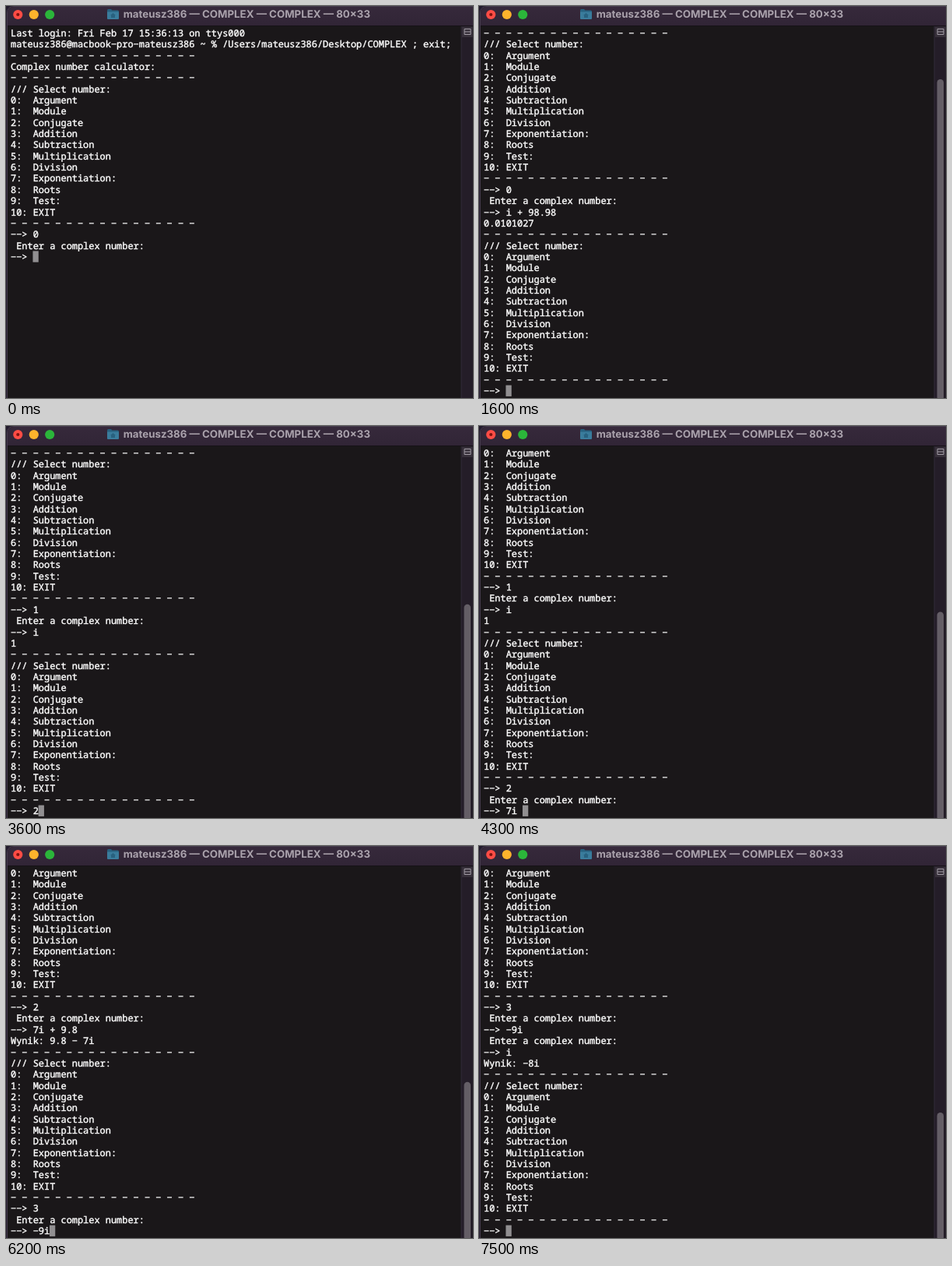
Recreate the animation shown at these times as an HTML page. Size 600 by 503 pixels, loop 8 s.

```html
<!DOCTYPE html>
<html lang="en">
<head>
<meta charset="utf-8">
<title>Complex number calculator</title>
<style>
  html, body { margin: 0; width: 100%; height: 100%; overflow: hidden; background: #1a1719; }
  svg { display: block; width: 600px; height: 503px; }
  text { white-space: pre; text-rendering: geometricPrecision; }
  #rows { font: 500 11.94px "Noto Sans Mono", monospace; fill: #fff; stroke: #fff; stroke-width: .4px; }
  #title { font: 700 13.3px Inter, sans-serif; fill: #aaa2ac; text-anchor: end; }
</style>
</head>
<body>
<svg viewBox="0 0 600 503">
  <defs>
    <linearGradient id="bar" x2="0" y2="1">
      <stop offset="0" stop-color="#36293b"/>
      <stop offset="1" stop-color="#312536"/>
    </linearGradient>
  </defs>
  <rect width="600" height="503" fill="#221a2c"/>
  <path d="M1.5 510V9Q1.5 .5 10 .5H610V510Z" fill="#1a1719" stroke="#51475a" stroke-width=".8"/>
  <path d="M2 25V9Q2 1 10 1H600V25Z" fill="url(#bar)"/>
  <path d="M2 25.5H600" stroke="#161117"/>

  <circle cx="15.3" cy="11" r="6.1" fill="#fe4c45"/>
  <circle cx="15.3" cy="11" r="2.1" fill="#7c130f"/>
  <circle cx="35.8" cy="11" r="6.1" fill="#fdb32c"/>
  <circle cx="56.2" cy="11" r="6.1" fill="#2bb53a"/>

  <g transform="translate(0 -.5)">
    <path d="M130 16V6Q130 4.5 131.5 4.5H135L136.5 6H143.5Q145 6 145 7.5V16Q145 17.5 143.5 17.5H131.5Q130 17.5 130 16Z" fill="#28617f"/>
    <path d="M130 8H145V16Q145 17.5 143.5 17.5H131.5Q130 17.5 130 16Z" fill="#3a7c9c"/>
    <path d="M137.5 9.5L141 12.5H140V15.5H135V12.5H134Z" fill="#28617f"/>
  </g>
  <text id="title" x="468" y="15.2"></text>

  <rect x="585" y="26" width="15" height="477" fill="#241d28"/>
  <path d="M585 26V503" stroke="#393040" stroke-width=".8"/>
  <rect x="586" y="26.5" width="13.5" height="13.5" fill="#37303a"/>
  <path d="M589 29.5H597V36.5H589ZM589 33H597" fill="none" stroke="#a39ca6"/>
  <rect id="knob" x="588.5" width="8.5" rx="4.25" fill="#645e66"/>

  <rect id="cursor" width="7.3" height="14.3" fill="#918f91"/>
  <g id="rows"></g>
</svg>
<script>
const LOOP = 8000, ROWS = 33, LEFT = 6, COL = 7.164, LINE = 14.35;
const USER = "mateusz386";
const $ = id => document.getElementById(id);

const rule = Array(17).fill("-").join(" ") + "\n";
const items = ["Argument", "Module", "Conjugate", "Addition", "Subtraction", "Multiplication",
  "Division", "Exponentiation:", "Roots", "Test:", "EXIT"];
const menu = rule + "/// Select number:\n" +
  items.map((name, i) => (i + ":").padEnd(4) + name + "\n").join("") + rule + "--> ";
const ask = "\n Enter a complex number:\n--> ";
const result = value => "\n" + value + "\n" + menu;

const intro = "Last login: Fri Feb 17 15:36:13 on ttys000\n" +
  `${USER}@macbook-pro-${USER} ~ % /Users/${USER}/Desktop/COMPLEX ; exit;\n` +
  rule + "Complex number calculator:\n" + menu + "0" + ask;

// Each entry appends its text to the session at the given time.
const session = [
  [0, intro],
  [200, "i"], [300, " "], [400, "+"], [500, " 9"], [600, "8."], [700, "98"],
  [1200, result("0.0101027")],
  [2200, "1" + ask], [2500, "i"], [3000, result("1")],
  [3400, "2"], [3800, ask],
  [4000, "7"], [4200, "i"], [4300, " "], [4400, "+"], [4500, " "], [4600, "9"], [4700, "."], [4800, "8"],
  [5000, result("Wynik: 9.8 - 7i")],
  [5400, "3"], [5500, ask],
  [6000, "-"], [6100, "9"], [6200, "i"],
  [7000, ask], [7200, "i"], [7400, result("Wynik: -8i")]
];

$("title").textContent = `${USER} — COMPLEX — COMPLEX — 80×33`;
const rows = Array.from({ length: ROWS }, (_, i) => {
  const row = document.createElementNS("http://www.w3.org/2000/svg", "text");
  row.setAttribute("x", LEFT);
  row.setAttribute("y", 38.9 + i * LINE);
  return $("rows").appendChild(row);
});

// The terminal's hyphen is as wide and high as a minus sign.
const widen = line => line.replaceAll("-", "\u2212");

let shown = 0;
function draw(ms) {
  const count = session.filter(([at]) => at <= ms).length;
  if (count === shown) return;
  shown = count;

  const lines = session.slice(0, count).map(step => step[1]).join("").split("\n");
  const view = lines.slice(-ROWS);
  rows.forEach((row, i) => { row.textContent = widen(view[i] || ""); });

  const last = view.length - 1;
  $("cursor").setAttribute("x", LEFT + view[last].length * COL - 0.2);
  $("cursor").setAttribute("y", 27.4 + last * LINE);

  const size = 461.7 * ROWS / lines.length;
  $("knob").setAttribute("y", 505.8 - size);
  $("knob").setAttribute("height", size);
  $("knob").setAttribute("visibility", lines.length > ROWS ? "visible" : "hidden");
}

const start = performance.now();
function tick() {
  draw((performance.now() - start) % LOOP);
  requestAnimationFrame(tick);
}
tick();
</script>
</body>
</html>
```
